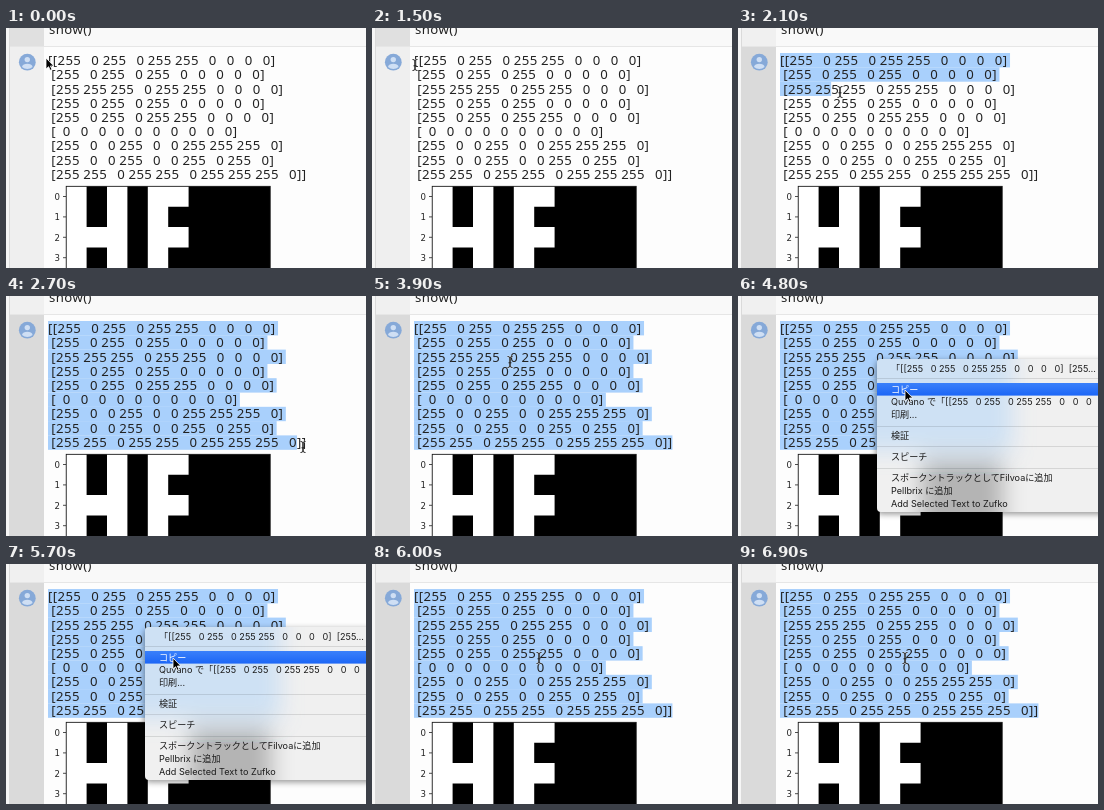
Write an HTML page that moves like this. It is 360 px wide and 240 px high and loops after 7.2 s.

```html
<!DOCTYPE html>
<html lang="ja">
<head>
<meta charset="utf-8">
<title>Copy an array</title>
<style>
  html, body { margin: 0; width: 100%; height: 100%; overflow: hidden; background: #fff; }
  svg { display: block; width: 100vw; height: 100vh; }
  text { white-space: pre; }
  .code { font: 13.2px "Noto Sans", "Open Sans", sans-serif; letter-spacing: .4px; word-spacing: -.48px; fill: #222; }
  .tick { font: 8.6px "DejaVu Sans", sans-serif; fill: #222; text-anchor: end; }
  .item { font: 9.1px Inter, "Noto Sans CJK JP", "Noto Sans CJK", sans-serif; fill: #1c1c1c; }
</style>
</head>
<body>
<svg id="stage" viewBox="0 0 360 240">
  <defs>
    <linearGradient id="blue" x2="0" y2="1">
      <stop stop-color="#3a80fa"/><stop offset="1" stop-color="#1c66f6"/>
    </linearGradient>
    <filter id="soft" x="-10%" y="-10%" width="120%" height="120%"><feGaussianBlur stdDeviation="3"/></filter>
    <filter id="frost" x="-30%" y="-40%" width="160%" height="180%"><feGaussianBlur stdDeviation="11"/></filter>
    <clipPath id="menuBox"><rect x="139" y="63" width="240" height="153" rx="4"/></clipPath>
  </defs>

  <rect width="360" height="240" fill="#fdfdfd"/>
  <rect width="360" height="19" fill="#f9f9f9"/>
  <rect width="4" height="240" fill="#f6f6f6"/>
  <rect id="gutterTop" x="4" width="34" height="18"/>
  <rect id="gutter" x="4" y="19" width="34" height="221"/>
  <rect x="3" width="1" height="240" fill="#dadada"/>
  <path d="M4 18.5H360" stroke="#e6e6e6"/>
  <g id="avatar">
    <circle cx="21.3" cy="34.2" r="8.4" fill="#86a9d8"/>
    <circle cx="21.3" cy="31.6" r="2.7" fill="#cfdff4"/>
    <path d="M16 39C16.4 34.8 26.2 34.8 26.6 39A8 8 0 0 1 16 39Z" fill="#cfdff4"/>
  </g>
  <text class="code" x="43" y="6">show()</text>
  <g id="marks" fill="#a9d0fc"></g>
  <g id="lines"></g>
  <g id="plot"></g>

  <g id="menu">
    <rect x="138" y="65" width="240" height="153" rx="5" opacity=".42" filter="url(#soft)"/>
    <g clip-path="url(#menuBox)">
      <rect x="139" y="63" width="240" height="154" fill="#f0f0f0"/>
      <g filter="url(#frost)">
        <rect x="42" y="25" width="232" height="129" fill="#a0cdfb" opacity=".42"/>
        <rect x="183" y="158" width="82" height="90" opacity=".25"/>
      </g>
    </g>
    <path d="M139 82.5H360M139 130.5H360M139 150.5H360M139 172.5H360" stroke="#000" opacity=".11"/>
    <rect id="hover" x="139" y="87" width="221" height="12.6" fill="url(#blue)"/>
    <g id="items"></g>
  </g>

  <path id="arrow" d="M0 0V11L2.6 8.7 4.2 12.3 6 11.5 4.4 8H7.8Z" stroke="#fff" stroke-width=".8"/>
  <g id="beam" fill="none">
    <path d="M-2.5-5.5Q0-5.5 0-4V4Q0 5.5-2.5 5.5M2.5-5.5Q0-5.5 0-4V4Q0 5.5 2.5 5.5" stroke="#fff" stroke-width="2" opacity=".6"/>
    <path d="M-2.5-5.5Q0-5.5 0-4V4Q0 5.5-2.5 5.5M2.5-5.5Q0-5.5 0-4V4Q0 5.5 2.5 5.5M-1.5.8H1.5" stroke="#222"/>
  </g>
</svg>
<script>
const $ = id => document.getElementById(id);
const LOOP = 7200, STEP = 300, LEFT = 42, LINE_END = 2.5;

function add(parent, tag, attrs, text) {
  const el = document.createElementNS("http://www.w3.org/2000/svg", tag);
  for (const k in attrs) el.setAttribute(k, attrs[k]);
  if (text !== undefined) el.textContent = text;
  return parent.appendChild(el);
}

// The word HELLO as pixels: one string per row.
const bits = ["1010110000", "1010100000", "1110110000", "1010100000", "1010110000",
  "0000000000", "1001001110", "1001001010", "1101101110"];
const rows = bits.map((row, i) => {
  const cells = [...row].map(b => (b === "1" ? "255" : "  0")).join(" ");
  return (i ? " [" : "[[") + cells + (i === 8 ? "]]" : "]");
});

const lines = rows.map((s, i) => add($("lines"), "text", { class: "code", x: LEFT, y: 37.1 + 14.2 * i }, s));
const marks = rows.map((s, i) => add($("marks"), "rect", { x: LEFT, y: 25 + 14.3 * i, height: 14.4 }));

const px = 20.4, plotX = 60.2, plotY = 158.3;
const frame = { x: plotX, y: plotY, width: px * 10, height: 100 };
add($("plot"), "rect", frame);
let white = "";
bits.slice(0, 4).forEach((row, j) => {
  const y = plotY + px * j, mid = y + px / 2;
  [...row].forEach((b, i) => {
    if (b === "1") white += `M${plotX + px * i} ${y}h${px}v${px}h${-px}z`;
  });
  add($("plot"), "path", { d: `M57 ${mid}H60`, stroke: "#222", "stroke-width": .8 });
  add($("plot"), "text", { class: "tick", x: 54, y: mid + 3.2 }, j);
});
add($("plot"), "path", { d: white, fill: "#fff" });
add($("plot"), "rect", { ...frame, fill: "none", stroke: "#111", "stroke-width": .8 });

const items = [
  [76, "「" + rows[0] + "  [255…"],
  [97, "コピー"],
  [109, "Quvano で「" + rows[0]],
  [122, "印刷..."],
  [143, "検証"],
  [164, "スピーチ"],
  [185, "スポークントラックとしてFilvoaに追加"],
  [198, "Pellbrix に追加"],
  [211, "Add Selected Text to Zufko"]
].map(([y, s]) => add($("items"), "text", { class: "item", x: 153, y }, s));

// Pointer positions: [step, x, y]
const pointer = [[0, 40, 30], [1, 52, 36], [2, 145, 72], [3, 167, 89], [4, 46, 40], [5, 43, 37],
  [6, 62, 46], [7, 102, 64], [8, 200, 105], [9, 297, 151], [10, 311, 157], [11, 284, 147],
  [12, 134, 78], [13, 138, 66], [14, 138, 63], [15, 165, 92], [16, 167, 94]];
// End of the selection: [step, line, characters]
const selection = [[0, -1, 0], [6, 1, 3], [7, 2, 8], [8, 5, 32], [9, 8, 41], [10, 8, 43]];

const at = (keys, step) => keys.findLast(k => k[0] <= step);
const show = (el, on) => el.setAttribute("visibility", on ? "visible" : "hidden");

function markWidth(i, last, chars) {
  if (i > last) return 0;
  const length = rows[i].length;
  return i < last
    ? lines[i].getSubStringLength(0, length) + LINE_END
    : lines[i].getSubStringLength(0, Math.min(chars, length));
}

function draw(t) {
  const step = Math.floor((t % LOOP) / STEP);
  const [, x, y] = at(pointer, step);
  const [, last, chars] = at(selection, step);
  const active = last >= 0, open = step >= 14 && step < 20, hover = open && step >= 15;

  $("gutterTop").setAttribute("fill", active ? "#f0f0f0" : "#e0e0e0");
  $("gutter").setAttribute("fill", active ? "#dadada" : "#efefef");
  marks.forEach((m, i) => m.setAttribute("width", markWidth(i, last, chars)));

  $("menu").setAttribute("display", open ? "inline" : "none");
  show($("hover"), hover);
  items[1].style.fill = hover ? "#fff" : "";

  const arrow = step === 0 || open;
  for (const id of ["arrow", "beam"]) $(id).setAttribute("transform", `translate(${x} ${y})`);
  show($("arrow"), arrow);
  show($("beam"), !arrow);
}

const start = performance.now();
function tick() {
  draw(performance.now() - start);
  requestAnimationFrame(tick);
}
tick();
</script>
</body>
</html>
```
